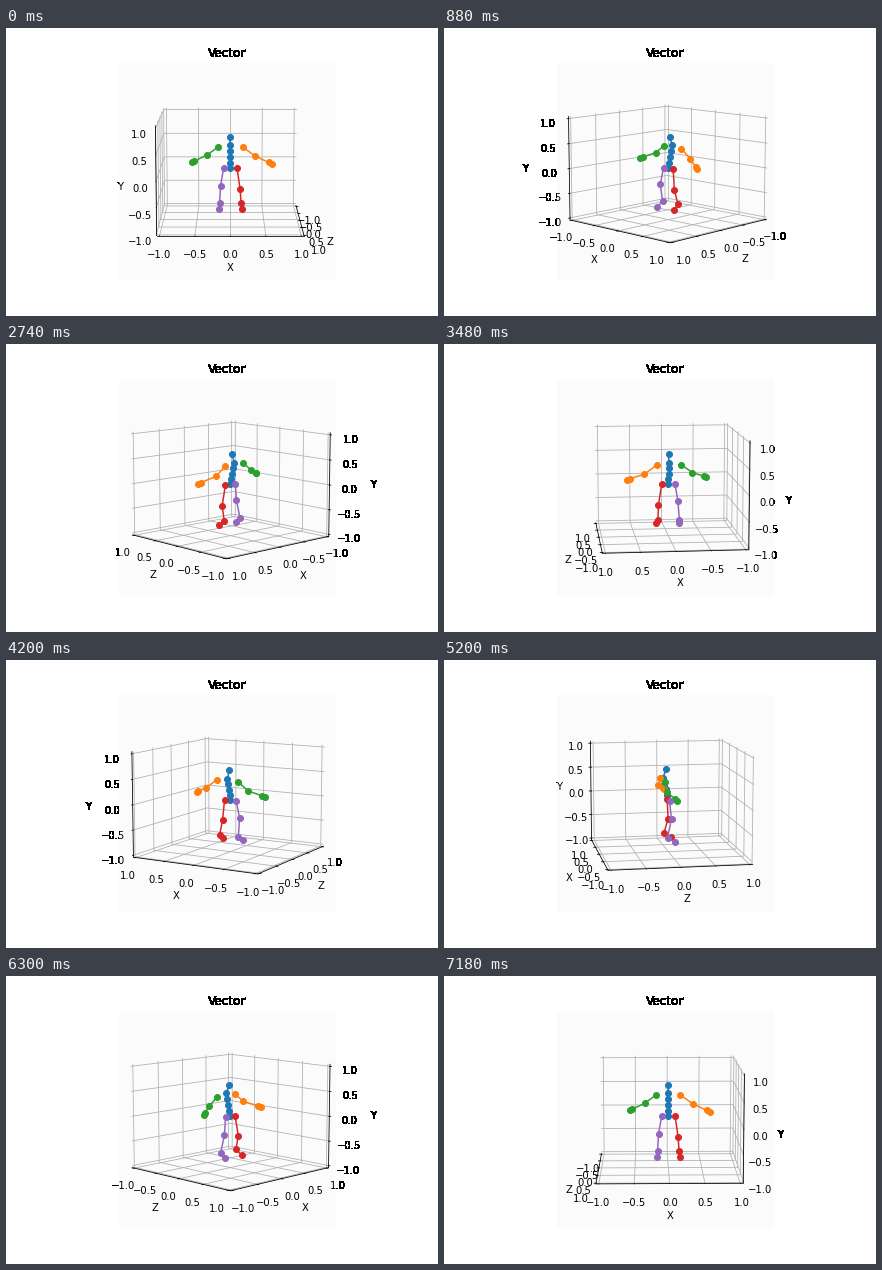
A matplotlib script for the animation above (7.2 s loop, 432 px wide and 288 px high).

```python
import numpy as np
import matplotlib.pyplot as plt
from matplotlib.animation import FuncAnimation
from matplotlib.collections import LineCollection

W, H = 432, 288
SIDE = 0.755 * H                                  # square plot area, px
BOX = 1.8294640721620434 * np.array([4, 3, 4]) / np.sqrt(41)
ELEV = np.radians(10)
EDGE = 25 / 24                                    # box half size, data units
TICKS = np.linspace(-1, 1, 5)
POINT = 48 / (2 * SIDE) / 6                       # one point, data units
FAR_DIM = (1, 0, 1)                               # where each axis lies on the far side
TICK_DIM = (2, 2, 0)                              # direction of each axis' tick marks


def spine():
    """Evenly spaced, leaning back, with the head set forward."""
    bones = np.outer(np.arange(5), (0, .112, -.021))
    return np.vstack([bones, (0, .622, -.035)])


def limb(side, root, joints, scale=1):
    """Chain of joints relative to its root; side -1 mirrors it."""
    points = np.array(root) + scale * np.array([(0, 0, 0), *joints])
    return points * (side, 1, 1)


def arm(side, reach):
    return limb(side, (.182, .411, -.088),
                [(.167, -.163, 0), (.352, -.262, .096), (.39, -.283, .12)], reach)


def leg(side, thigh):
    return limb(side, (.1, 0, 0),
                [(.046, -thigh, .022), (.061, -.71, -.041), (.073, -.804, .068)])


BODY = [spine(), arm(1, 1.1), arm(-1, 1), leg(1, .413), leg(-1, .344)]


def project(points, azim):
    """Perspective view of data points from a camera circling the Y axis."""
    x, y, z = np.moveaxis(np.asarray(points, float) * BOX / 2, -1, 0)
    s, c = np.sin(azim), np.cos(azim)
    near = x * s + z * c
    depth = 10 - near * np.cos(ELEV) - y * np.sin(ELEV)
    up = y * np.cos(ELEV) - near * np.sin(ELEV)
    return np.stack([(x * c - z * s) / depth, up / depth], axis=-1)


def harden(img, dpi):
    """Turn soft glyph edges solid black."""
    img[..., 3] = img[..., 3] > 0
    img[..., :3] = 0
    return img, 0, 0


def make_axes():
    left = 54 + (0.775 * W - SIDE) / 2
    ax = fig.add_axes([left / W, 0.125, SIDE / W, SIDE / H])
    ax.set(xlim=(-.095, .09), ylim=(-.095, .09), xticks=[], yticks=[])
    ax.spines[:].set_visible(False)
    return ax


def make_labels(ax):
    ticks = [[ax.text(0, 0, f"{t:.1f}".replace("-", "\u2212"), ha="center", va="top")
              for t in TICKS] for _ in range(3)]
    names = [ax.text(0, 0, n, ha="center", va="center") for n in "XYZ"]
    return ticks, names


fig = plt.figure(figsize=(W / 72, H / 72), dpi=72, facecolor="white")

# Text outside the plot area is hard-edged; the front patch hides the rest.
under = make_axes()
under.patch.set_visible(False)
under.set_title("Vector")
under.set_agg_filter(harden)

front = make_axes()
front.set_facecolor("#fbfbfb")
grid = front.add_collection(
    LineCollection([], colors="#b0b0b0", linewidths=0.8, zorder=1), autolim=False)
marks = front.add_collection(
    LineCollection([], colors="black", linewidths=0.8, zorder=1.3), autolim=False)
spines = [front.plot([], [], color="black", lw=0.8, zorder=1.2)[0] for _ in range(3)]
chains = [front.plot([], [], "o-", color=f"C{i}", lw=1.5, ms=6, zorder=4)[0]
          for i in range(len(BODY))]
label_sets = [make_labels(under), make_labels(front)]


def update(i):
    azim = np.radians(i)
    eye = np.array([np.sin(azim), np.sin(ELEV), np.cos(azim)])
    far = np.where(eye < -1e-9, EDGE, -EDGE)
    near = -far
    grid_lines, tick_lines = [], []

    for k in range(3):
        walls = np.tile(far, (len(TICKS), 3, 1))
        walls[:, :, k] = TICKS[:, None]
        walls[:, 0, k - 2] = near[k - 2]
        walls[:, 2, k - 1] = near[k - 1]
        grid_lines.extend(project(walls, azim))

        edge = near.copy()
        edge[FAR_DIM[k]] = far[FAR_DIM[k]]
        edge[k] = 0
        out = np.sign(edge)

        ends = np.tile(edge, (2, 1))
        ends[:, k] = -EDGE, EDGE
        spines[k].set_data(*project(ends, azim).T)

        at = np.tile(edge, (len(TICKS), 1))
        at[:, k] = TICKS
        step = np.zeros(3)
        step[TICK_DIM[k]] = out[TICK_DIM[k]] / 6
        tick_lines.extend(project(np.stack([at + 0.2 * step, at - 0.1 * step], 1), azim))

        tick_pos = project(at + out * 11.5 * POINT, azim)
        name_pos = project(edge + out * 25 * POINT, azim)
        for ticks, names in label_sets:
            names[k].set_position(name_pos)
            for text, pos in zip(ticks[k], tick_pos):
                text.set_position(pos)

    grid.set_segments(grid_lines)
    marks.set_segments(tick_lines)
    for line, joints in zip(chains, BODY):
        line.set_data(*project(joints, azim).T)
    return chains


anim = FuncAnimation(fig, update, frames=360, interval=20, repeat=True,
                     repeat_delay=0, blit=False)
plt.show()
```
